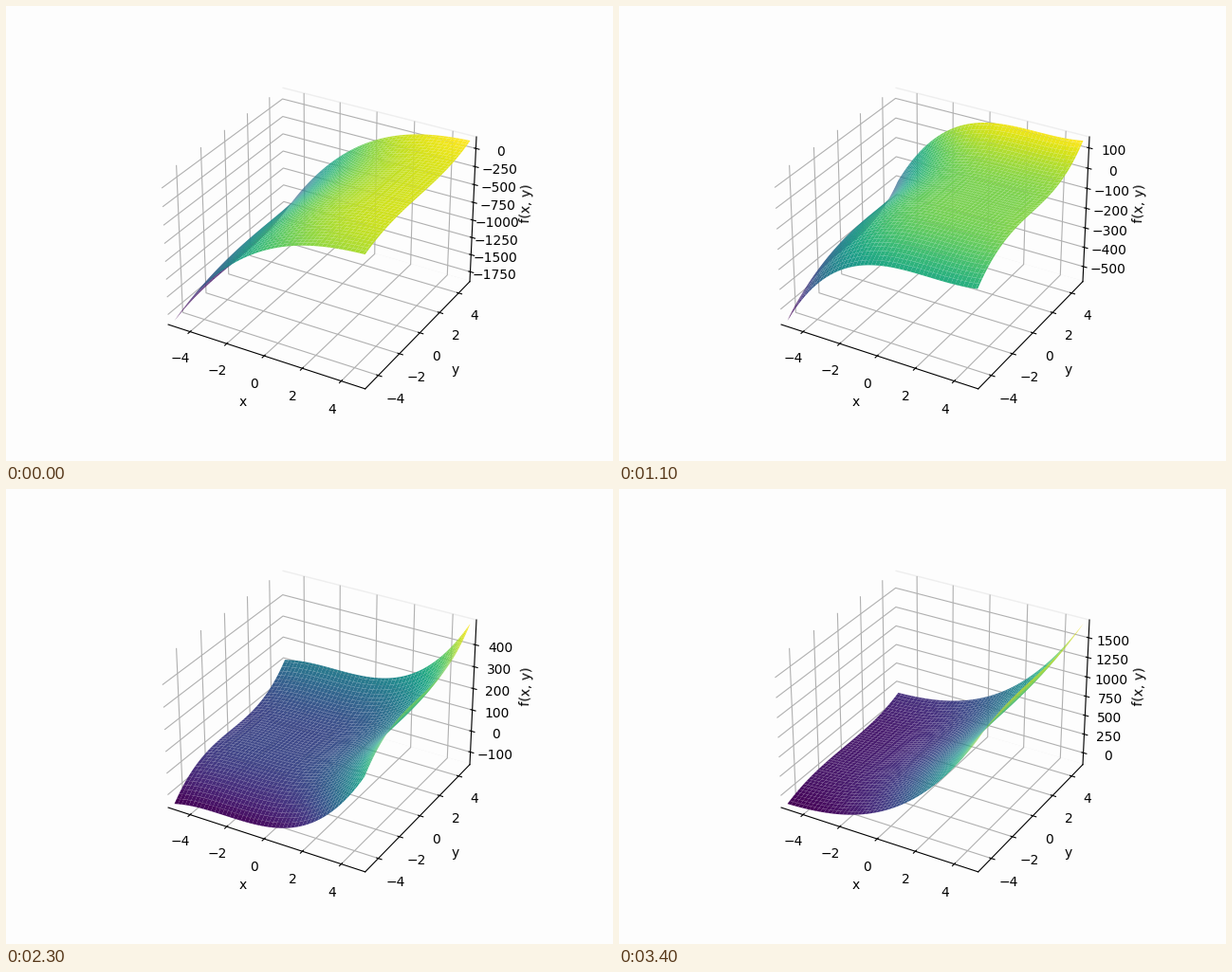
A matplotlib script for the animation above (3.5 s loop, 640 by 480 pixels).

```python
import numpy as np
import matplotlib.pyplot as plt
from matplotlib.animation import FuncAnimation

FRAMES = 35
INTERVAL = 100  # ms
MARGIN = 1 / 48
PAPER = "#fdfdfd"
EDGE = "#eeeeee"

plt.rcParams["font.family"] = "DejaVu Sans"

fig = plt.figure(figsize=(6.4, 4.8), dpi=100, facecolor=PAPER)
ax = fig.add_subplot(projection="3d", facecolor=PAPER)

axis_values = np.linspace(-5, 5, 100)
X, Y = np.meshgrid(axis_values, axis_values)


def style_axes(z_min, z_max):
    for axis in (ax.xaxis, ax.yaxis, ax.zaxis):
        axis.set_pane_color(PAPER)
    ax.yaxis.pane.set_edgecolor(EDGE)
    ax.set_xlabel("x")
    ax.set_ylabel("y")
    ax.set_zlabel("f(x, y)")

    # Ticks stay within the data; the margin around it is left bare.
    ticks = ax.zaxis.get_major_locator().tick_values(z_min, z_max)
    ax.set_zticks([t for t in ticks if z_min <= t <= z_max])
    ax.set_xticks(range(-4, 5, 2))
    ax.set_yticks(range(-4, 5, 2))
    ax.set_xlim(-5, 5, view_margin=MARGIN)
    ax.set_ylim(-5, 5, view_margin=MARGIN)
    ax.set_zlim(z_min, z_max, view_margin=MARGIN)


def draw(i):
    shift = -7 + 0.4 * i
    Z = (X + shift) ** 3 + Y ** 3
    ax.clear()
    ax.plot_surface(X, Y, Z, cmap="viridis")
    style_axes(Z.min(), Z.max())
    return []


anim = FuncAnimation(fig, draw, frames=FRAMES, init_func=lambda: draw(0),
                     interval=INTERVAL, repeat=True, repeat_delay=0, blit=False)
plt.show()
```
